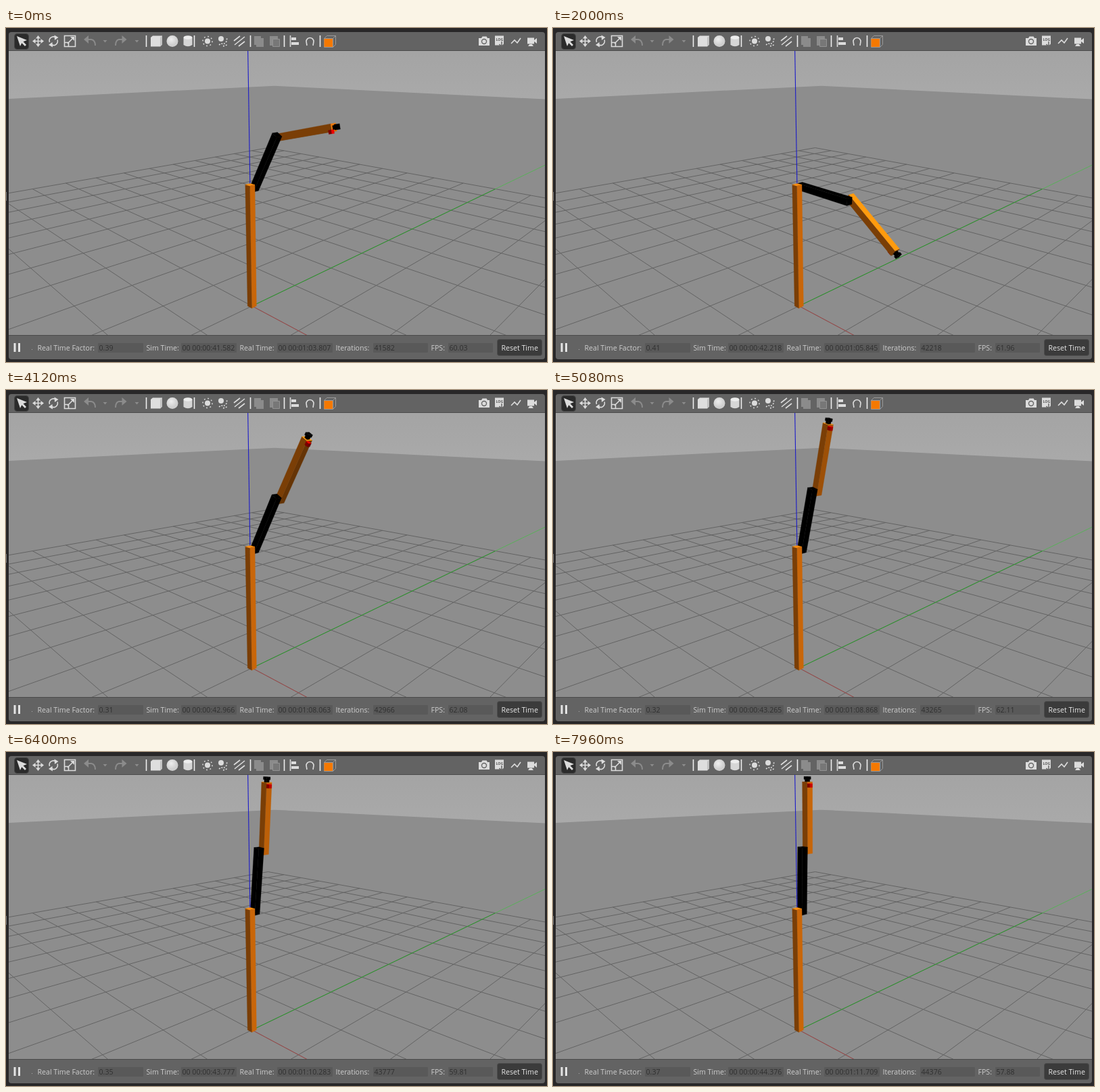
An HTML page for the animation above (8000 ms loop, 800x495 px).

```html
<!DOCTYPE html>
<html lang="en">
<head>
<meta charset="utf-8">
<title>Robot arm simulation</title>
<style>
  html, body { margin: 0; width: 100%; height: 100%; overflow: hidden; background: #282728; }
  svg { display: block; width: 800px; height: 495px; }
  text { font: 10.6px "Open Sans", "Noto Sans", sans-serif; white-space: pre; }
  .label { fill: #cdcdcd; }
  .value { fill: #303030; }
  .icon { fill: #dcdcdc; stroke: none; }
  .line { fill: none; stroke: #dcdcdc; stroke-width: 1.6; }
  .off { fill: #8b8b8b; stroke: none; }
  .offline { fill: none; stroke: #8b8b8b; stroke-width: 2; }
</style>
</head>
<body>
<svg viewBox="0 0 800 495">
  <defs>
    <clipPath id="view"><rect x="4" y="34" width="793" height="421.5"/></clipPath>
    <linearGradient id="sky" x2="0" y2="1"><stop stop-color="#a4a4a4"/><stop offset="1" stop-color="#aaaaaa"/></linearGradient>
    <radialGradient id="ball" cx=".4" cy=".35"><stop stop-color="#eee"/><stop offset="1" stop-color="#cfcfcf"/></radialGradient>
  </defs>
  <rect width="800" height="495" fill="#282728"/>
  <rect y="243" width="1" height="13" fill="#777"/>
  <rect x="4" y="6" width="793" height="485" rx="4" fill="#636363"/>

  <g clip-path="url(#view)">
    <rect x="4" y="34" width="793" height="80" fill="url(#sky)"/>
    <path id="ground" fill="#8d8d8d"/>
    <g id="floor" fill="none"></g>
    <g id="arm" stroke-width=".3" stroke-linejoin="round"></g>
  </g>
  <path d="M4 33.5H797M4 455.5H797" stroke="#4b4b4b"/>

  <g id="toolbar">
    <rect x="12.5" y="8.5" width="21" height="23" rx="4" fill="#2b2b2b" stroke="#454545"/>
    <path class="icon" d="M16 12l15 6-5.500 2.300 4.500 4.700-2 2-4.700-4.700L21 27z"/>
    <path class="line" d="M41 19.500H54M47.500 13V26"/>
    <path class="icon" d="M47.500 11l3.500 4.500h-7zM47.500 28l3.500-4.500h-7zM39 19.500l4.500-3.500v7zM56 19.500l-4.500-3.500v7z"/>
    <path class="line" stroke-width="2" d="M64.500 21a6 6 0 0 1 9-7M76 17.500a6 6 0 0 1-9 7"/>
    <path class="icon" d="M71.500 10.500l6 3.500-5.500 4zM69 28.500l-6-3.500 5.500-4z"/>
    <path class="line" d="M86.500 11.500h16v16h-16zM86.500 21.500h6v6M91 23l8-8"/>
    <path class="icon" d="M101 13v6l-6-6z"/>
    <path class="offline" d="M119 17h7q6 1 6 9"/><path class="off" d="M115 17l7-6v12zM143.500 18h6l-3 3.500z"/>
    <path class="offline" d="M174 17h-7q-5 1-5 9"/><path class="off" d="M178.500 17l-7-6v12zM190.500 18h6l-3 3.500z"/>
    <path d="M207.500 11V28M278.500 11V28M361.500 11V28M411.500 11V28M464.500 11V28" stroke="#eee" stroke-width="1.600"/>
    <path d="M214 14l3-2.500h14v13l-3 3h-14z" fill="#dedede"/><path d="M228 14l3-2.500v13l-3 3z" fill="#c4c4c4"/>
    <circle cx="246" cy="19.500" r="8.500" fill="url(#ball)"/>
    <path d="M262.500 14v11q6.500 4.500 13 0V14z" fill="#d6d6d6"/><ellipse cx="269" cy="14" rx="6.500" ry="2.800" fill="#ededed"/>
    <circle class="icon" cx="298" cy="19.500" r="4"/>
    <circle class="line" cx="298" cy="19.500" r="7" stroke-width="2.200" stroke-dasharray="1.800 3.698"/>
    <circle class="icon" cx="318" cy="16" r="4"/>
    <path class="line" stroke-dasharray="2 2" d="M315 25l3-2 4 1 4-4 1-6M321 27l6-2"/>
    <path class="line" d="M337 19l9-7M338 25l15-12M344 27l9-7"/>
    <path class="off" d="M367 12h10v13h-10zM370 15h11v13h-11z"/>
    <path class="off" d="M390 12h12v14h-12z"/><path d="M394.500 16.500h10v11h-10z" fill="#777" stroke="#929292"/>
    <path class="line" d="M420.500 11V28"/><path class="icon" d="M422 14h7v4h-7zM422 21h11v4h-11z"/>
    <path class="line" stroke-width="3" d="M445 26l-1-6a5.500 5.500 0 0 1 11 0l-1 6"/>
    <path d="M470.500 15.500l4-4h13v13l-4 4h-13zM483.500 15.500l4-4M470.500 15.500h13v13" fill="none" stroke="#999"/>
    <rect x="470.500" y="16" width="12.500" height="12" fill="#f57900"/>
    <path class="icon" d="M699 15h4l1.500-2.500h6L712 15h3v11h-16z"/><circle cx="707" cy="20" r="3.500" fill="#dcdcdc" stroke="#666" stroke-width="1.400"/>
    <path class="icon" d="M723 11.500h13v14h-13z"/><path d="M733 20v7M729.500 24l3.500 4 3.500-4" fill="none" stroke="#666" stroke-width="1.500"/>
    <text x="724.500" y="18.500" fill="#555" style="font-size:5.200px;font-weight:700">LOG</text>
    <path class="line" stroke-width="1.800" d="M747 23l5-5 4 4 5-7"/>
    <path class="icon" d="M771 14.500h10v9h-10zM781 18l4-3v8l-4-3zM775 23l-3 4h8l-3-4z"/>
  </g>

  <g id="status">
    <path d="M11.500 467h3v13h-3zM18 467h3v13h-3z" fill="#e4e4e4"/>
    <rect x="38" y="476" width="1" height="1" fill="#aaa"/>
    <rect x="726.500" y="461.500" width="66" height="24" rx="3" fill="#3b3b3b" stroke="#4c4c4c"/>
    <text x="732.500" y="477.500" fill="#e8e8e8">Reset Time</text>
  </g>
</svg>
<script>
const $ = id => document.getElementById(id);
const make = (parent, tag, attrs) => {
  const el = document.createElementNS('http://www.w3.org/2000/svg', tag);
  for (const k in attrs) el.setAttribute(k, attrs[k]);
  return parent.appendChild(el);
};

// Camera: position, pitch, focal length, centre of the view
const eye = [4.96, -4.402, 3.745], pitch = 0.275643, focal = 687, center = [400.5, 244.5];
const sp = Math.sin(pitch), cp = Math.cos(pitch), near = 0.2;

const toCamera = ([x, y, z]) => {
  const dx = x - eye[0], dy = y - eye[1], drop = eye[2] - z;
  const ahead = (dy - dx) * Math.SQRT1_2;
  return [(dx + dy) * Math.SQRT1_2, drop * cp - ahead * sp, ahead * cp + drop * sp];
};
const toScreen = ([x, y, d]) => [center[0] + x / d * focal, center[1] + y / d * focal];
const pathOf = pts => 'M' + pts.map(p => p.map(v => v.toFixed(2)).join(' ')).join('L');
const project = p => toScreen(toCamera(p));

function segment(a, b) {
  a = toCamera(a); b = toCamera(b);
  if (a[2] < near && b[2] < near) return '';
  if (a[2] > b[2]) [a, b] = [b, a];
  if (a[2] < near) {
    const k = (near - a[2]) / (b[2] - a[2]);
    a = a.map((v, i) => v + (b[i] - v) * k);
  }
  return pathOf([toScreen(a), toScreen(b)]);
}

$('ground').setAttribute('d',
  pathOf([[-50, -50, 0], [-50, 50, 0], [50, 50, 0]].map(project)) + 'V600H-6200Z');
let grid = '';
for (let i = -10; i <= 10; i++) {
  grid += segment([i, -10, 0], [i, 10, 0]) + segment([-10, i, 0], [10, i, 0]);
}
const floorLine = (d, stroke) => make($('floor'), 'path', { d, stroke });
floorLine(grid, '#636363');
floorLine(segment([0, 0, 0], [10, 0, 0]), '#a04a4a');
floorLine(segment([0, 10, 0], [0, 40, 0]), '#58b058');
floorLine(segment([0, 0, 0], [0, 10, 0]), '#2a9c2a');

const orange = [255, 130, 12], red = [255, 0, 0], black = [0, 0, 0];
const sun = [0.483, -0.097, 0.87];
const dot = (a, b) => a[0] * b[0] + a[1] * b[1] + a[2] * b[2];
const shade = (color, n) => {
  const k = 0.4 + 0.8 * Math.max(0, dot(n, sun));
  return `rgb(${color.map(c => Math.min(255, Math.round(c * k)))})`;
};

// Frame of a link turned about the y axis
const frameAt = (joint, angle) => {
  const s = Math.sin(angle), c = Math.cos(angle);
  const axes = [[c, 0, -s], [0, 1, 0], [s, 0, c]];
  return { axes, point: p => joint.map((v, i) => v + axes.reduce((sum, a, j) => sum + a[i] * p[j], 0)) };
};

// Faces of a box that point to the camera, as markup
function box(frame, lo, hi, color) {
  let out = '';
  for (let axis = 0; axis < 3; axis++) for (const side of [-1, 1]) {
    const u = (axis + 1) % 3, v = (axis + 2) % 3;
    const corners = [[0, 0], [1, 0], [1, 1], [0, 1]].map(([i, j]) => {
      const p = [];
      p[axis] = side < 0 ? lo[axis] : hi[axis];
      p[u] = i ? hi[u] : lo[u];
      p[v] = j ? hi[v] : lo[v];
      return frame.point(p);
    });
    const normal = frame.axes[axis].map(c => c * side);
    if (dot(normal, eye.map((c, i) => c - corners[0][i])) <= 0) continue;
    const fill = shade(color, normal);
    out += `<path d="${pathOf(corners.map(project))}Z" fill="${fill}" stroke="${fill}"/>`;
  }
  return out;
}

const w = 0.05;
const bar = (frame, from, to, color, half = w) => box(frame, [-half, -half, from], [half, half, to], color);
const faces = (frame, axis, at) =>
  dot(frame.axes[axis], eye.map((c, i) => c - frame.point(at)[i])) > 0;
const pole = bar(frameAt([0, 0, 0], 0), 0, 2, orange);
const zAxis = `<path d="${segment([0, 0, 2], [0, 0, 6])}" stroke="#1c1cc8" stroke-width="1.1"/>`;

function drawArm(lower, upper) {
  const first = frameAt([0, 0.1, 1.95], lower);
  const second = frameAt(first.point([0, 0.1, 0.9]), upper);
  const scanner = bar(second, 0.95, 0.985, black, 0.024) + bar(second, 0.985, 1.02, black, 0.034);
  const lens = box(second, [0.025, -0.025, 0.875], [0.075, 0.025, 0.925], red);
  const parts = [bar(second, -w, 0.95, orange)];
  faces(second, 0, [w, 0, 0.9]) ? parts.push(lens) : parts.unshift(lens);
  faces(second, 2, [0, 0, 0.95]) ? parts.push(scanner) : parts.unshift(scanner);
  $('arm').innerHTML = parts.join('') + bar(first, -w, 0.95, black) + zAxis + pole;
}

// time, lower angle, upper angle
const pose = [
  [0, 0.51, 1.335], [420, 0.58, 1.52], [840, 0.76, 1.86], [1300, 1.24, 2.32], [1650, 1.54, 2.4],
  [2000, 1.6, 2.2], [2520, 1.42, 1.68], [3040, 1.08, 1.16], [3580, 0.75, 0.79], [4120, 0.5, 0.52],
  [5080, 0.25, 0.23], [6400, 0.105, 0.07], [7960, 0.029, 0.008], [8000, 0.028, 0.007]];
// time, simulated seconds, real seconds
const clock = [
  [0, 41.582, 63.807], [2000, 42.218, 65.845], [3040, 42.544, 66.852], [4120, 42.966, 68.063],
  [5080, 43.265, 68.868], [6400, 43.777, 70.283], [7960, 44.376, 71.709], [8000, 44.391, 71.746]];
// time, real time factor, frame rate
const rates = [
  [0, 0.39, 60.03], [800, 0.4, 60.92], [1720, 0.41, 61.96], [2680, 0.35, 62.29], [3640, 0.31, 62.08],
  [4600, 0.32, 62.11], [5600, 0.35, 59.81], [6600, 0.36, 59.81], [6960, 0.36, 58.74], [7680, 0.37, 57.88]];

const indexAt = (table, t) => table.findLastIndex(row => row[0] <= t);
function linear(table, t, col) {
  const i = Math.min(indexAt(table, t), table.length - 2), a = table[i], b = table[i + 1];
  return a[col] + (b[col] - a[col]) * (t - a[0]) / (b[0] - a[0]);
}
function smooth(table, t, col) {
  const last = table.length - 1, i = Math.min(indexAt(table, t), last - 1);
  const slope = k => {
    const a = table[Math.max(0, k - 1)], b = table[Math.min(last, k + 1)];
    return (b[col] - a[col]) / (b[0] - a[0]);
  };
  const a = table[i], b = table[i + 1], h = b[0] - a[0], u = (t - a[0]) / h, v = 1 - u;
  return v * v * (1 + 2 * u) * a[col] + u * u * (3 - 2 * u) * b[col]
    + h * u * v * (v * slope(i) - u * slope(i + 1));
}

const fields = [
  ['Real Time Factor:', 46.5, 136, 67], ['Sim Time:', 207.5, 259, 82], ['Real Time:', 345.5, 401, 82],
  ['Iterations:', 487.5, 543, 81], ['FPS:', 628.5, 654, 66]
].map(([name, x, left, width]) => {
  make($('status'), 'rect', { x: left, y: 467, width, height: 14, rx: 1, fill: '#595959' });
  make($('status'), 'text', { x, y: 477.5, class: 'label' }).textContent = name;
  return make($('status'), 'text', { x: left + 1.5, y: 477.5, class: 'value' });
});

const stamp = s => `00 00:0${Math.floor(s / 60)}:${(s % 60).toFixed(3).padStart(6, '0')}`;

function draw(t) {
  drawArm(smooth(pose, t, 1), smooth(pose, t, 2));
  const sim = linear(clock, t, 1), rate = rates[indexAt(rates, t)];
  [rate[1].toFixed(2), stamp(sim), stamp(linear(clock, t, 2)), Math.round(sim * 1000), rate[2].toFixed(2)]
    .forEach((value, i) => { fields[i].textContent = value; });
}

const start = performance.now(), loop = 8000, step = 40;
function tick() {
  const t = (performance.now() - start) % loop;
  draw(Math.floor(t / step) * step);
  requestAnimationFrame(tick);
}
tick();
</script>
</body>
</html>
```
